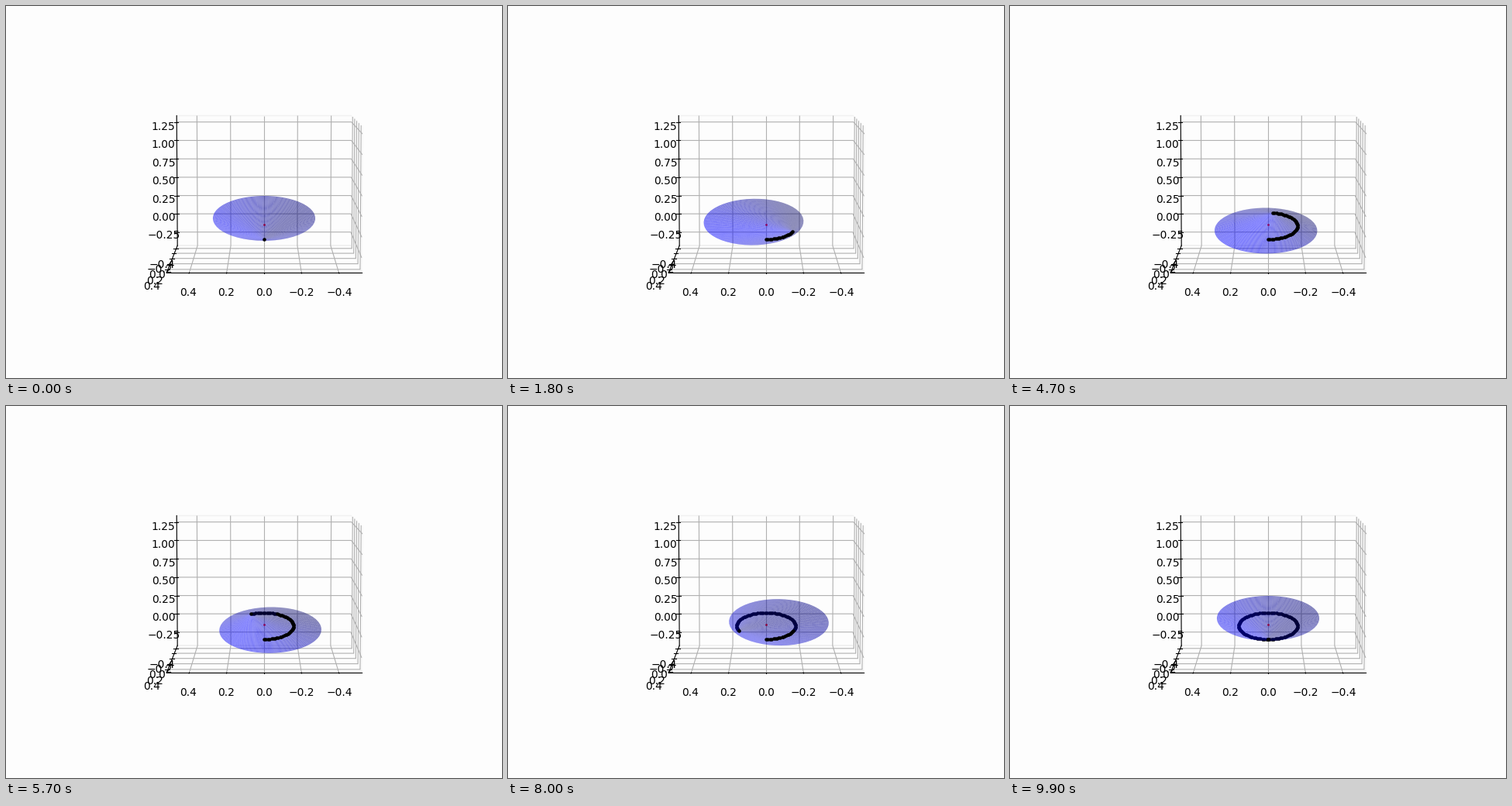
Recreate the animation shown at these times as a matplotlib script. Size 640 by 480 pixels, loop 10 s.

```python
import numpy as np
import matplotlib.pyplot as plt
from matplotlib.animation import FuncAnimation

FRAMES = 100
TILT = np.radians(15)
RADIUS, TIP, BASE = 0.3, 0.6, -0.3   # cone along y, centre of mass at the origin
PAPER = "#fdfdfd"

angles = np.linspace(0, 2 * np.pi, FRAMES)
axis = np.array([0, np.cos(TILT), np.sin(TILT)])


def spin(points, angle):
    """Rotate points (..., 3) about the precession axis."""
    along = (points @ axis)[..., None] * axis
    return (along + (points - along) * np.cos(angle)
            + np.cross(axis, points) * np.sin(angle))


def make_cone(n=50):
    s, u = np.meshgrid(np.linspace(1e-3, 1, n), np.linspace(0, 2 * np.pi, n))
    return np.stack([RADIUS * s * np.cos(u),
                     TIP + (BASE - TIP) * s,
                     RADIUS * s * np.sin(u)], axis=-1)


def padded(lo, hi):
    pad = (hi - lo) / 48
    return lo - pad, hi + pad


cone = make_cone()
tip = np.array([0, TIP, 0])
trail = np.array([spin(tip, a) for a in angles])

fig = plt.figure(figsize=(6.4, 4.8), dpi=100, facecolor=PAPER)
ax = fig.add_subplot(projection="3d", computed_zorder=False)
ax.set_facecolor(PAPER)
ax.set(xlim=padded(-0.5, 0.5), ylim=padded(-0.5, 0.5), zlim=padded(-0.4, 1.3))
ax.view_init(elev=6, azim=90)
for side in (ax.xaxis, ax.yaxis, ax.zaxis):
    side.pane.fill = False

ax.scatter(0, 0, 0, color="red", s=1, zorder=4)
shown = []


def dots(points, zorder):
    if len(points):
        shown.append(ax.scatter(*points.T, color="black", s=5,
                                depthshade=False, zorder=zorder))


def update(i):
    while shown:
        shown.pop().remove()
    x, y, z = np.moveaxis(spin(cone, angles[i]), -1, 0)
    shown.append(ax.plot_surface(x, y, z, color="blue", alpha=0.5, zorder=5))
    # Tips higher up the circle lie farther away, so the cone covers them.
    past = trail[:i + 1]
    near = np.cos(angles[:i + 1]) >= np.cos(angles[i]) - 1e-9
    dots(past[~near], 4)
    dots(past[near], 6)
    return shown


anim = FuncAnimation(fig, update, frames=FRAMES, interval=100,
                     init_func=lambda: update(0), repeat=True, repeat_delay=0)
plt.show()
```
